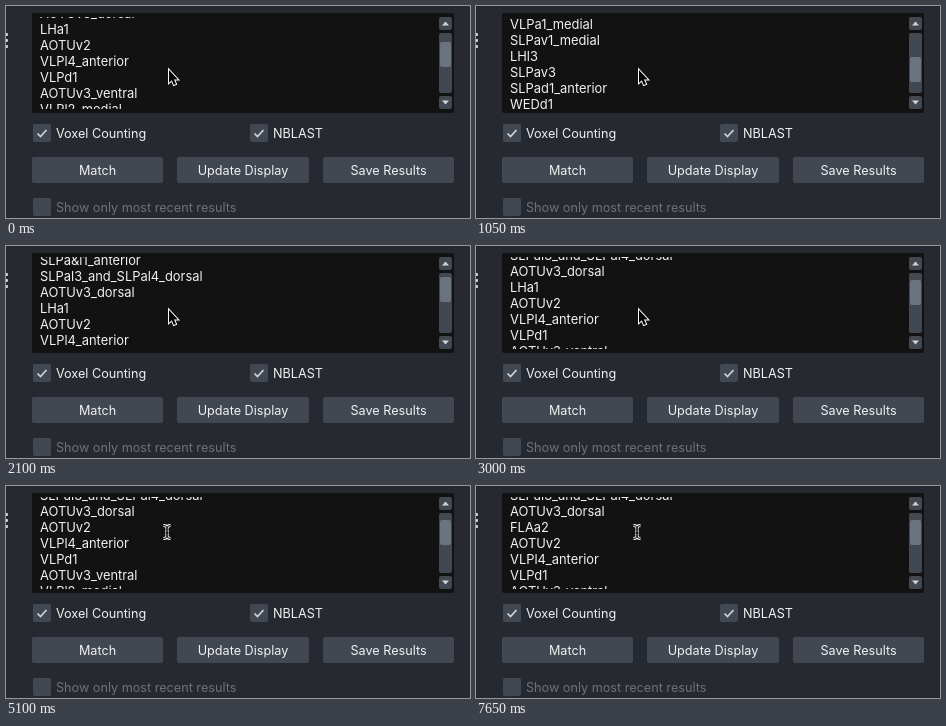
An HTML page with a canvas that plays this animation: 464 px wide and 212 px high, repeating every 8000 ms.

```html
<!DOCTYPE html>
<html lang="en">
<head>
<meta charset="utf-8">
<style>
  html, body { margin: 0; width: 100%; height: 100%; overflow: hidden; background: #262930; }
  canvas { display: block; }
</style>
</head>
<body>
<canvas id="stage" width="464" height="212"></canvas>
<script>
const ctx = document.getElementById('stage').getContext('2d');
const LOOP = 8000, STEP = 150, LINE = 16;
const TEXT = '#f0f1f2', BUTTON = '#414851', DIM = '#6d727a', MARK = '#d0d3d7';
const LIST_FONT = '12.9px Inter, sans-serif', LABEL_FONT = '12.65px Inter, sans-serif';

const before = ['SLPa&l1_anterior', 'SLPal3_and_SLPal4_dorsal', 'AOTUv3_dorsal'];
const after = ['AOTUv2', 'VLPl4_anterior', 'VLPd1', 'AOTUv3_ventral', 'VLPl2_medial',
  'VLPd&p1_dorsal', 'VLPa1_medial', 'SLPav1_medial', 'LHl3', 'SLPav3', 'SLPad1_anterior', 'WEDd1'];

// [time, centre of the first line]
const scroll = [[0, -25], [600, -105], [750, -122], [900, -135], [1050, -142], [1200, -128],
  [1350, -90], [1500, -45], [1650, 0], [1950, 0], [2100, 14], [2400, 20], [2550, 20],
  [2700, 12], [2850, 0], [3000, -7]];
// [time, x, y]
const pointer = [[0, 162, 63], [3000, 162, 63], [3300, 125, 52], [3600, 97, 36],
  [3750, 97, 36], [3900, 156, 38]];
// [time, edited line]; null removes the line
const edits = [[0, 'LHa1'], [4350, 'LHa'], [4500, 'LH'], [4650, 'L'], [4800, ''], [5100, null],
  [5700, ''], [6300, 'F'], [6450, 'FL'], [6600, 'FLA'], [7050, 'FLAa'], [7350, 'FLAa2']];
const caretOn = [[4200, 5100], [5700, 6150], [6300, 6600], [7350, 7650]];

const latest = (keys, t) => keys.filter(k => k[0] <= t).pop();

function tween(keys, t, n = 1) {
  const a = latest(keys, t), b = keys[keys.indexOf(a) + 1];
  return b ? a[n] + (b[n] - a[n]) * (t - a[0]) / (b[0] - a[0]) : a[n];
}

function box(x, y, w, h, color, radius = 2) {
  ctx.fillStyle = color;
  ctx.beginPath();
  ctx.roundRect(x, y, w, h, radius);
  ctx.fill();
}

function label(text, x, y, color = TEXT, align = 'left') {
  ctx.font = LABEL_FONT;
  ctx.textAlign = align;
  ctx.fillStyle = color;
  ctx.fillText(text, x, y);
}

function button(text, x, w) {
  box(x, 151, w, 26, BUTTON);
  label(text, x + w / 2, 169, TEXT, 'center');
}

function checkbox(text, x) {
  box(x, 118, 18, 18, BUTTON);
  ctx.strokeStyle = MARK;
  ctx.lineWidth = 1.7;
  ctx.stroke(new Path2D(`M${x + 4.5} 127.5l3 3 6-6.5`));
  label(text, x + 23, 132);
}

function scrollbar(first) {
  box(433, 11, 13, 13, BUTTON);
  box(433, 27, 13, 60, BUTTON);
  box(433, 90, 13, 13, BUTTON);
  box(434, Math.round(36 - (first + 25) * .128), 11, 25, '#6a7380');
  ctx.fillStyle = MARK;
  ctx.fill(new Path2D('M436 19.5l3.5-4 3.5 4zM436 94.5l3.5 4 3.5-4z'));
}

function list(t) {
  const first = Math.round(tween(scroll, t)), edited = latest(edits, t)[1];
  const lines = [...before, ...(edited === null ? [] : [edited]), ...after];
  box(26, 7, 422, 100, '#121212');
  ctx.save();
  ctx.beginPath();
  ctx.rect(30, 11, 400, 92);
  ctx.clip();
  ctx.font = LIST_FONT;
  ctx.textAlign = 'left';
  ctx.fillStyle = TEXT;
  lines.forEach((text, i) => ctx.fillText(text, 34, first + i * LINE + 5));
  if (caretOn.some(([from, to]) => t >= from && t < to)) {
    const x = 34 + Math.floor(ctx.measureText(edited).width);
    ctx.fillRect(x, first + before.length * LINE - 8, 1, LINE);
  }
  ctx.restore();
  scrollbar(first);
}

const arrow = new Path2D('M1 1v12.8l2.8-2.6 2.1 4.8 2.1-.9-2.1-4.7h3.9z');
const beam = new Path2D('M1.5 1.5q3.5 0 3.5 2.5v8q0 2.5-3.5 2.5M8.5 1.5q-3.5 0-3.5 2.5v8q0 2.5 3.5 2.5M3 9h4');

function drawPointer(t) {
  ctx.save();
  ctx.translate(Math.round(tween(pointer, t)), Math.round(tween(pointer, t, 2)));
  ctx.strokeStyle = '#fff';
  if (t < 3600) {
    ctx.lineWidth = 2;
    ctx.stroke(arrow);
    ctx.fillStyle = '#000';
    ctx.fill(arrow);
  } else {
    ctx.lineWidth = 3;
    ctx.stroke(beam);
    ctx.strokeStyle = '#000';
    ctx.lineWidth = 1;
    ctx.stroke(beam);
  }
  ctx.restore();
}

function draw(now) {
  const t = Math.floor(now % LOOP / STEP) * STEP;
  ctx.fillStyle = '#262930';
  ctx.fillRect(0, 0, 464, 212);
  for (const y of [27, 33, 39]) box(-1, y, 3, 3, MARK, 1);
  list(t);
  checkbox('Voxel Counting', 27);
  checkbox('NBLAST', 244);
  button('Match', 26, 131);
  button('Update Display', 171, 132);
  button('Save Results', 317, 131);
  box(27, 192, 18, 18, BUTTON);
  label('Show only most recent results', 50, 206, DIM);
  drawPointer(t);
}

function frame() {
  draw(performance.now());
  requestAnimationFrame(frame);
}
frame();
</script>
</body>
</html>
```
